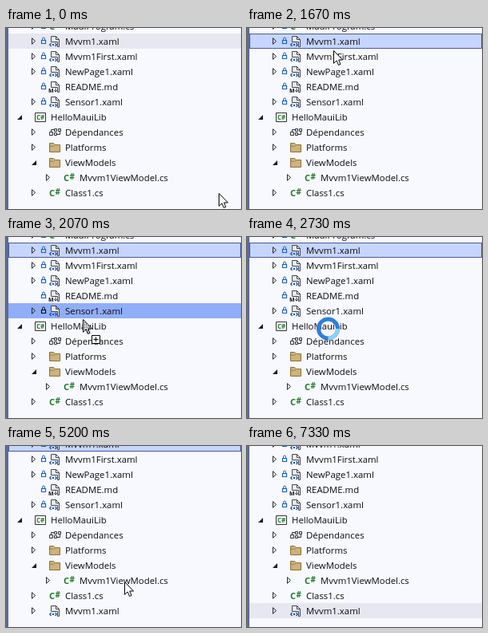
An HTML page that plays this animation: 294x227 px, repeating every 7390 ms.

```html
<!DOCTYPE html>
<html lang="fr">
<head>
<meta charset="utf-8">
<title>Solution tree</title>
<style>
html, body { margin: 0; width: 100%; height: 100%; overflow: hidden; background: #f8f9fe; }
svg { display: block; width: 294px; height: 227px; }
text { font: 11.4px "Open Sans", "Noto Sans", sans-serif; fill: #0c0c0e; }
.sharp { font-weight: 700; font-size: 11px; fill: #1f7a2a; }
.mark { font-weight: 700; font-size: 7px; }
.line { fill: none; stroke: #303136; }
.page { fill: #e9eaf0; stroke: #45464c; }
.blue { fill: none; stroke: #1a4f9c; stroke-width: 1.2; }
</style>
</head>
<body>
<svg viewBox="0 0 294 227">
  <defs>
    <pattern id="dots" width="2" height="2" patternUnits="userSpaceOnUse">
      <path fill="#fff" d="M0 0H2V2H0Z"/><path d="M0 0H1V1H0Z"/>
    </pattern>
    <path id="pointer" d="M.5 .5V16.3L4.1 12.9 6.5 18.5 9 17.4 6.7 12H11.6Z"/>
    <path id="page" class="page" d="M2.5 8.5V1.5H8.5L12.5 5.5V14.5H10.5V8.5ZM8.5 1.5V5.5H12.5"/>
    <g id="xaml">
      <use href="#page"/>
      <path d="M2.5 10 .7 12 2.5 14M7.5 10 9.3 12 7.5 14" class="blue"/>
      <path d="M4 11H6V13H4Z" fill="#1a4f9c"/>
    </g>
    <g id="md">
      <use href="#page"/>
      <text x="-1" y="15" class="mark">M</text>
      <path d="M8 9.5V14M6.2 12.2 8 14.2 9.8 12.2" class="line"/>
    </g>
    <g id="cs">
      <text x="0" y="12" class="sharp">C</text>
      <text x="7.5" y="10" class="sharp" style="font-size:10px">#</text>
    </g>
    <g id="project">
      <path d="M.5 2.5H13.5V13.5H.5Z" class="line" style="fill:#fff"/>
      <text x="2" y="11" class="sharp" style="font-size:8px">C#</text>
    </g>
    <g id="deps" class="line">
      <path d="M.5 7.5H4.5V11.5H.5ZM6.5 3.5H9.5V6.5H6.5ZM6.5 8.5H9.5V11.5H6.5ZM11.5 3.5H14.5V6.5H11.5Z"/>
      <path d="M2.5 7V4.5H6M9.5 10.5H13.5V7"/>
    </g>
    <path id="folder" d="M.5 2.5H5.5L7.5 4.5H13.5V13.5H.5ZM.5 6H6L7.5 4.5" fill="#ccb27c" stroke="#8f6f33"/>
    <g id="lock" fill="none" stroke="currentColor">
      <path d="M1.5 4V2.5A1.5 1.5 0 0 1 4.5 2.5V4"/>
      <path d="M.5 4.5H5.5V8.5H.5Z" stroke-width="1.2"/>
    </g>
    <path id="closed" d="M.5 .7V8.3L4.5 4.5Z" fill="none" stroke="#26272b" transform="translate(0 5)"/>
    <path id="open" d="M6 0V6H0Z" fill="#1e1e1e" transform="translate(0 7)"/>
  </defs>
  <g id="tree">
    <rect id="selected" x="3.5" width="290" height="18"/>
    <rect id="target" x="3" width="291" height="19" fill="#90aef8"/>
    <g id="rows"></g>
  </g>
  <path d="M0 0H3V227H0Z" fill="#5d6b99"/>
  <g id="ring" fill="none" stroke-width="5">
    <circle r="12" stroke="#2f7fd6"/>
    <path d="M0 -12A12 12 0 0 1 12 0" stroke="#8fd0f8"/>
  </g>
  <g id="cursor">
    <use id="plain" href="#pointer" fill="#fff" stroke="#000"/>
    <g id="drag">
      <use href="#pointer" fill="url(#dots)" stroke="#000"/>
      <path d="M11.5 20.5H21.5V30.5H11.5Z" fill="#fff" stroke="#000"/>
      <path d="M16.5 22.5V28.5M13.5 25.5H19.5" stroke="#000"/>
    </g>
  </g>
</svg>
<script>
const ROW = 19, TOP = 7, LOOP = 7390;
const $ = id => document.getElementById(id);

// name, icon, icon x, expander, locked
const items = [
  ["MauiProgram.cs", "cs", 54, "closed", true],
  ["Mvvm1.xaml", "xaml", 54, "closed", true],
  ["Mvvm1First.xaml", "xaml", 54, "closed", true],
  ["NewPage1.xaml", "xaml", 54, "closed", true],
  ["README.md", "md", 54, "", true],
  ["Sensor1.xaml", "xaml", 54, "closed", true],
  ["HelloMauiLib", "project", 36, "open"],
  ["Dépendances", "deps", 54, "closed"],
  ["Platforms", "folder", 54, "closed"],
  ["ViewModels", "folder", 54, "open"],
  ["Mvvm1ViewModel.cs", "cs", 72, "closed"],
  ["Class1.cs", "cs", 54, "closed"],
  ["Mvvm1.xaml", "xaml", 54, "closed"]
];
const rowY = i => TOP + ROW * i;
const use = (id, x, y) => `<use href="#${id}" x="${x}" y="${y}"/>`;

$("rows").innerHTML = items.map(([name, icon, x, arrow, locked], n) =>
  `<g class="row" transform="translate(0 ${rowY(n - 1)})">` +
  (arrow ? use(arrow, x - 22, 0) : "") +
  (locked ? use("lock", 44, 4) : "") + use(icon, x, 2) +
  `<text x="${x + 20}" y="14">${name}</text></g>`
).join("");
const rows = [...document.querySelectorAll(".row")];

// tick, x, y of the pointer tip
const path = [
  [0, 266, 207], [12, 122, 36], [13, 122, 36], [22, 107, 13], [24, 107, 13],
  [25, 108, 28], [31, 96, 103], [33, 95, 110], [59, 95, 110], [60, 104, 114],
  [65, 144, 126], [73, 144, 126], [78, 148, 170], [84, 134, 177],
  [90, 96, 209], [98, 96, 209], [99, 94, 210]
];
const DRAG = 26, DROP = 38, SETTLE = 41, READY = 60, ADDED = 62;
const FOCUS = 12, CLICK = 94, LEAVE = 100, BLUR = 110;

function tip(tick) {
  const i = path.findIndex(p => p[0] >= tick);
  if (i < 1) return path[i ? path.length - 1 : 0].slice(1);
  const [a, b] = [path[i - 1], path[i]];
  const u = (tick - a[0]) / (b[0] - a[0]);
  const k = between(tick, DRAG, DROP) ? u : u * u * (3 - 2 * u);
  return [1, 2].map(j => Math.round(a[j] + (b[j] - a[j]) * k));
}

const show = (el, on) => el.setAttribute("visibility", on ? "visible" : "hidden");
const between = (tick, from, to) => tick >= from && tick < to;

function draw(ms) {
  // the screen refreshes 15 times a second
  const tick = Math.floor((Math.floor(ms / 10) + 0.5) * 0.15);
  const [x, y] = tip(tick);
  const waiting = between(tick, DROP, READY);
  const dragging = between(tick, DRAG, DROP);
  const active = between(tick, FOCUS, BLUR);

  $("tree").setAttribute("transform", `translate(0 ${tick >= ADDED ? -ROW : 0})`);
  show(rows[12], tick >= ADDED);

  const selected = $("selected");
  selected.setAttribute("y", rowY(tick >= CLICK ? 11 : 0) + 0.5);
  selected.setAttribute("fill", active ? "#c5d5ff" : "#e6e7f0");
  selected.setAttribute("stroke", active ? "#4a5a96" : "#e6e7f0");

  // the drop highlight trails the pointer by one tick
  const hovering = between(tick, DRAG, SETTLE);
  const over = Math.floor((tip(tick - 1)[1] - TOP) / ROW);
  show($("target"), hovering);
  $("target").setAttribute("y", rowY(over));
  rows.forEach((row, n) =>
    row.setAttribute("color", hovering && n === over + 1 ? "#101010" : "#1a62b8"));

  const turn = 90 * Math.max(0, Math.min(tick, SETTLE + 1) - SETTLE + 1);
  $("ring").setAttribute("transform", `translate(101.5 115) rotate(${turn})`);
  show($("ring"), waiting);

  $("cursor").setAttribute("transform", `translate(${x} ${y})`);
  show($("plain"), !dragging && !waiting && tick < LEAVE);
  show($("drag"), dragging);
}

const start = performance.now();
function loop() {
  draw((performance.now() - start) % LOOP);
  requestAnimationFrame(loop);
}
draw(0);
requestAnimationFrame(loop);
</script>
</body>
</html>
```
